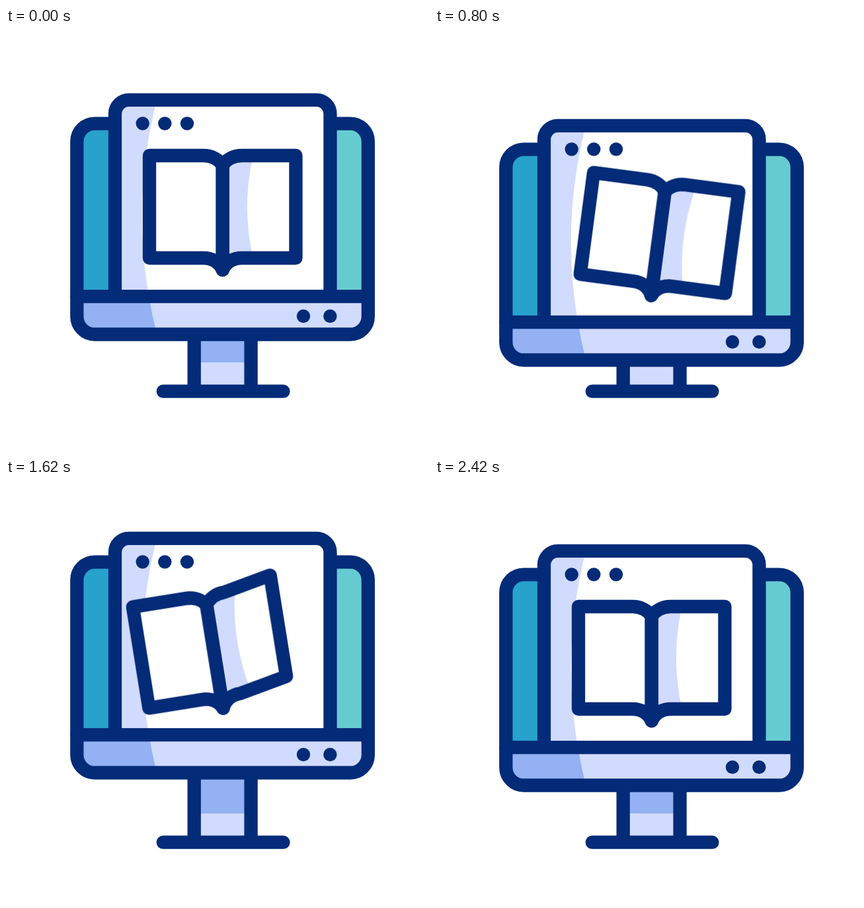
Write an HTML page that moves like this. It is 640x640 px and loops after 2.62 s.

```html
<!DOCTYPE html>
<html lang="en">
<head>
<meta charset="utf-8">
<title>E-book on a monitor</title>
<style>
  html, body { margin: 0; width: 100%; height: 100%; overflow: hidden; background: #fff; }
  svg { display: block; width: 100%; height: 100%; }

  .line { fill: none; stroke: #042b78; stroke-width: 20.3; stroke-linecap: round; stroke-linejoin: round; }
  .dot { fill: #042b78; }
  .white { fill: #fff; }
  .pale { fill: #d1dbfd; }
  .blue { fill: #93b1f3; }
  .teal { fill: #27a2cc; }
  .mint { fill: #66cbd0; }

  .screen, .book, .page {
    animation: 2620ms cubic-bezier(.333, 0, .667, 1) infinite;
  }
  .screen { animation-name: bob; }
  .book { animation-name: tilt; transform-origin: 327.75px 361px; }
  .page {
    animation-name: flap;
    d: path("M327.75 208C322.5 199 312 193 357 193L438.5 193L438.5 348L357 348C344 348 333 354 327.75 366Z");
  }

  @keyframes bob {
    0%, 7.634% { transform: translateY(0); }
    41.49% { transform: translateY(51.5px); }
    66.18% { transform: translateY(-25.3px); }
    92.366%, 100% { transform: translateY(0); }
  }
  @keyframes tilt {
    0%, 7.634% { transform: rotate(0deg); }
    41.49% { transform: rotate(10deg); }
    66.18% { transform: rotate(-10.8deg); }
    92.366%, 100% { transform: rotate(0deg); }
  }
  @keyframes flap {
    0%, 41.49%, 92.366%, 100% {
      d: path("M327.75 208C333 199 344 193 357 193L438.5 193L438.5 348L357 348C344 348 333 354 327.75 366Z");
    }
    66.18% {
      d: path("M327.75 208C333 199 344 193 357 193L429.1 177.3L429.1 332.3L357 348C344 348 333 354 327.75 366Z");
    }
  }
</style>
</head>
<body>
<svg viewBox="0 0 640 640">
  <g class="stand">
    <path class="pale" d="M285 430H370V550H285Z"/>
    <path class="blue" d="M285 430H370V506H285Z"/>
    <path class="line" d="M284.7 435V549.7M370.6 435V549.7M237.8 549.7H419.5"/>
  </g>

  <g class="screen">
    <rect class="teal" x="107.3" y="144.6" width="440.6" height="318.9" rx="27"/>
    <path class="mint" d="M480 144.6H520.9a27 27 0 0 1 27 27V406H480Z"/>
    <path class="pale" d="M107.3 406H547.9V436.5a27 27 0 0 1-27 27H134.3a27 27 0 0 1-27-27Z"/>
    <path class="blue" d="M107.3 406H216.2A711 711 0 0 0 228.2 463.5H134.3a27 27 0 0 1-27-27Z"/>
    <rect class="line" x="107.3" y="144.6" width="440.6" height="318.9" rx="27"/>

    <path class="white" d="M165 406V129.8a21 21 0 0 1 21-21H469.5a21 21 0 0 1 21 21V406Z"/>
    <path class="pale" d="M228.2 108.8A711 711 0 0 0 216.2 406H165V129.8a21 21 0 0 1 21-21Z"/>
    <path class="line" d="M165 406V129.8a21 21 0 0 1 21-21H469.5a21 21 0 0 1 21 21V406M107.3 406.2H547.9"/>

    <g class="dot">
      <circle cx="206.7" cy="144.5" r="10.2"/>
      <circle cx="240.3" cy="144.5" r="10.2"/>
      <circle cx="274" cy="144.5" r="10.2"/>
      <circle cx="450" cy="436" r="10.2"/>
      <circle cx="490.4" cy="436" r="10.2"/>
    </g>

    <g class="book">
      <path class="page white"/>
      <path class="pale" d="M327.75 198H372.5A354 354 0 0 0 373 345H327.75Z"/>
      <path class="line" style="fill:#fff" d="M327.75 208C322.5 199 311.5 193 298.5 193H217V348H298.5C311.5 348 322.5 354 327.75 366Z"/>
      <path class="page line"/>
    </g>
  </g>
</svg>
</body>
</html>
```
